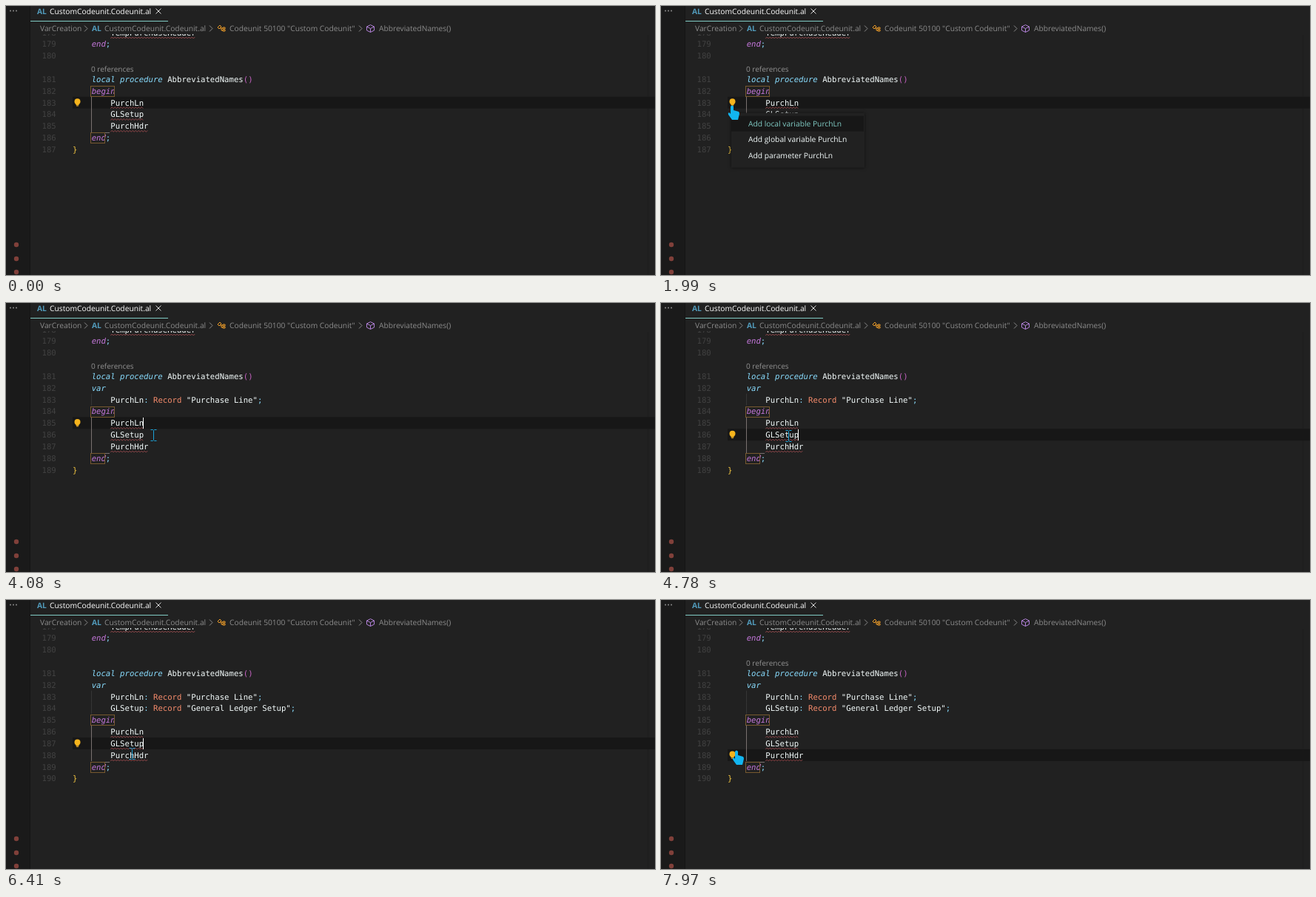
Write an HTML page with a canvas that moves like this. It is 877 by 364 pixels and loops after 8000 ms.

```html
<!DOCTYPE html>
<html lang="en">
<head>
<meta charset="utf-8">
<title>Code actions</title>
<style>
html, body { margin: 0; width: 100%; height: 100%; overflow: hidden; background: #212121; }
canvas { display: block; }
</style>
</head>
<body>
<canvas id="stage" width="877" height="364"></canvas>
<script>
const ctx = document.getElementById('stage').getContext('2d');
const LOOP = 8000, CHAR = 6.41, ROW = 15.85, TOP = 99;
const CODE = '10.65px "DejaVu Sans Mono", monospace';
const UI = '10.25px "Open Sans", "Noto Sans", sans-serif';
const WHITE = '#f4fcfc', CYAN = '#89ddff', PURPLE = '#c678dd', ORANGE = '#f78c6c', TEAL = '#80cbc4', GRAY = '#8c8c8c';

// Moments at which the editor changes
const ADD_LINE = 3000, FORMAT = 3800, ADD_SETUP = 6410;
const MENUS = [[1980, ADD_LINE, 'PurchLn', 183], [5640, ADD_SETUP, 'GLSetup', 186]];
// [start, line number]; 0 hides the bulb
const BULBS = [[0, 183], [ADD_LINE, 185], [4400, 0], [4480, 186], [ADD_SETUP, 187], [7430, 0], [7580, 188]];
// [on, off, line number, column]
const CARETS = [[600, 1670, 183, 11], [3000, 3530, 185, 11], [4060, 4400, 185, 11], [4400, 4930, 186, 11],
  [5460, 5640, 186, 11], [6410, 6960, 187, 11], [7430, 7960, 188, 12]];
// [time, x, y]
const POINTER = [[70, 638, 351], [200, 370, 225], [320, 235, 160], [450, 185, 138], [600, 185, 138],
  [760, 200, 128], [1140, 194, 132], [1300, 194, 132], [1680, 96, 131], [1830, 90, 134], [2140, 101, 134],
  [2520, 168, 174], [2840, 168, 174], [2920, 167, 163], [3150, 167, 163], [3310, 211, 173], [3790, 211, 173],
  [4080, 199, 179], [4640, 199, 179], [5180, 94, 181], [5490, 94, 181], [5600, 89, 181], [6030, 170, 208],
  [6410, 170, 208], [6790, 232, 203], [6960, 232, 203], [7110, 219, 208], [7430, 219, 208], [7970, 102, 203]];

const HAND = new Path2D('M-2 2Q0-1 2 2V7L9 9Q10 10 10 12L8 20H0L-5 13Q-6 11-4 10L-2 12Z');
const CUBE = new Path2D('M0-5L5-2.5V2.5L0 5L-5 2.5V-2.5ZM-5-2.5L0 0L5-2.5M0 0V5');
const CLASS = new Path2D('M-5-1L-2-4L0-2L-3 1ZM-2 0H2M0 0V3H2M2-1H5V1H2ZM2 2H5V4H2Z');

const lineY = n => TOP + (n - 181) * ROW;
const latest = (list, t) => list.filter(item => item[0] <= t).pop();

function text(str, x, y, color, font = UI) {
  ctx.font = font;
  ctx.fillStyle = color;
  ctx.fillText(str, x, y + 3.8);
}

function code(col, y, ...parts) {
  for (const [str, color, style = ''] of parts) {
    text(str, 90 + col * CHAR, y, color, style + CODE);
    col += str.length;
  }
}

function rect(x, y, w, h, color) {
  ctx.fillStyle = color;
  ctx.fillRect(x, y, w, h);
}

function path(shape, x, y, color, fill) {
  ctx.save();
  ctx.translate(x, y);
  ctx.fillStyle = ctx.strokeStyle = color;
  ctx.lineWidth = 1;
  fill ? ctx.fill(shape) : ctx.stroke(shape);
  ctx.restore();
}

function dot(x, y, r, color) {
  ctx.fillStyle = color;
  ctx.beginPath();
  ctx.arc(x, y, r, 0, 7);
  ctx.fill();
}

function squiggle(x, y, chars) {
  ctx.strokeStyle = '#93474a';
  ctx.lineWidth = 1;
  ctx.beginPath();
  for (let i = 0; i <= chars * CHAR; i += 2) ctx.lineTo(x + i, y + (i % 4 ? 6 : 8));
  ctx.stroke();
}

function statement(name, y) {
  code(8, y, [name, WHITE]);
  squiggle(90 + 8 * CHAR, y, name.length);
}

function block(keyword, y, end = '') {
  code(4, y, [keyword, PURPLE, 'italic '], [end, CYAN]);
  ctx.strokeStyle = '#77592f';
  ctx.lineWidth = 1;
  ctx.strokeRect(114.5, Math.round(y) - 6.5, Math.round(keyword.length * CHAR), 14);
}

function drawCode(t) {
  const stage = t < ADD_LINE ? 0 : t < ADD_SETUP ? 1 : 2;
  const last = 187 + (stage && stage + 1);
  const caret = CARETS.find(c => t >= c[0] && t < c[1]);
  const active = t < 3000 ? 183 : t < 4400 ? 185 : t < ADD_SETUP ? 186 : t < 7430 ? 187 : 188;

  rect(90, lineY(active) - 8, 787, 16, '#171717');
  const hidden = t > ADD_LINE && t < FORMAT || t > ADD_SETUP && t < 6750;
  if (!hidden) text('0 references', 115, 85.5, '#929292', UI.replace('10.25', '10'));

  for (let n = 179; n <= last; n++) {
    text(String(n), 48.5, n < 181 ? lineY(n) - ROW : lineY(n), '#424242', CODE);
  }
  ctx.save();
  ctx.beginPath();
  ctx.rect(33, 38, 844, 20);
  ctx.clip();
  text('178', 48.5, 36, '#424242', CODE);
  statement('TempPurchaseHeader', 36);
  ctx.restore();
  code(4, 51.5, ['end', PURPLE, 'italic '], [';', CYAN]);

  let n = 181;
  code(4, lineY(n++), ['local procedure ', CYAN, 'italic '], ['AbbreviatedNames', WHITE], ['()', '#c764c4']);
  if (stage) {
    code(4, lineY(n++), ['var', CYAN, 'italic ']);
    const declare = (name, table, col = 8) => {
      rect(115, lineY(n) - 8, 1, 16, '#353535');
      code(col, lineY(n++), [name, WHITE], [': ', CYAN], ['Record ', ORANGE], [`"${table}"`, WHITE], [';', CYAN]);
    };
    declare('PurchLn', 'Purchase Line', t < FORMAT ? 12 : 8);
    if (stage > 1) declare('GLSetup', 'General Ledger Setup');
  }
  const beginY = lineY(n++);
  for (const name of ['PurchLn', 'GLSetup', 'PurchHdr']) statement(name, lineY(n++));
  const endY = lineY(n);
  rect(115, Math.round(beginY) + 8, 1, Math.round(endY - beginY) - 15, '#78706f');
  rect(115, Math.round(endY) - 7, 25, 1, '#78706f');
  block('begin', beginY);
  block('end', endY, ';');
  code(0, lineY(last), ['}', '#f5c842']);

  if (caret) rect(Math.round(90 + (caret[3] + 4) * CHAR) - 1, Math.round(lineY(caret[2])) - 7, 1, 15, '#fff');
  const bulb = latest(BULBS, t)[1];
  if (bulb) drawBulb(96.5, lineY(bulb) - 1.5);
}

function drawBulb(x, y) {
  dot(x, y, 4, '#f5b41d');
  rect(x - 2, y + 2, 4, 3, '#f5b41d');
  rect(x - 1.5, y + 5, 3, 1.5, '#b98a28');
}

function drawMenu(name, line) {
  const y = lineY(line) + 14;
  ctx.save();
  ctx.shadowColor = '#0009';
  ctx.shadowBlur = 4;
  rect(95, y, 180, 74, '#212121');
  ctx.restore();
  rect(95, y + 4, 179, 21, '#171717');
  ['local variable', 'global variable', 'parameter'].forEach((kind, i) =>
    text(`Add ${kind} ${name}`, 118, y + 14.5 + i * 21.4, i ? WHITE : TEAL));
}

function drawFrame() {
  rect(0, 0, 877, 364, '#212121');
  rect(0, 0, 33, 364, '#1a1a1a');
  rect(32, 0, 1, 364, '#151515');
  rect(867, 39, 1, 325, '#1d1d1d');
  [6, 10, 14].forEach(x => dot(x, 6.5, 0.9, '#999'));
  [323, 342, 360].forEach(y => dot(14, y, 3.2, '#80403a'));

  text('AL', 42, 7, '#519aba', 'bold ' + UI);
  text('CustomCodeunit.Codeunit.al', 59, 7, '#fff');
  path(new Path2D('M-3.5-3.5L3.5 3.5M3.5-3.5L-3.5 3.5'), 206, 7, '#ddd');
  rect(33, 20, 186, 1, TEAL);

  text('VarCreation', 46, 30, GRAY);
  text('AL', 116, 30, '#519aba', 'bold ' + UI);
  text('CustomCodeunit.Codeunit.al', 133, 30, GRAY);
  text('Codeunit 50100 "Custom Codeunit"', 302, 30, GRAY);
  text('AbbreviatedNames()', 504, 30, GRAY);
  [108, 277, 479].forEach(x => path(new Path2D('M-2-4L2 0L-2 4'), x, 30.5, GRAY));
  path(CLASS, 291, 30, '#ee9d28');
  path(CUBE, 492.5, 30.5, '#b180d7');
}

function drawPointer(t) {
  const from = latest(POINTER, t);
  if (!from) return;
  const to = POINTER[POINTER.indexOf(from) + 1] || from;
  const k = to === from ? 0 : (t - from[0]) / (to[0] - from[0]);
  const [x, y] = [1, 2].map(i => Math.round(from[i] + (to[i] - from[i]) * k));
  if (x < 107) path(HAND, x, y, '#12b5f0', true);
  else path(new Path2D('M-4-7.5H-1L0-6.5L1-7.5H4M0-6.5V6.5M-4 7.5H-1L0 6.5L1 7.5H4'), x + 0.5, y, '#1ba1d6');
}

function draw(now) {
  const t = now % LOOP;
  ctx.textRendering = 'geometricPrecision';
  drawFrame();
  drawCode(t);
  for (const [open, close, name, line] of MENUS) if (t >= open && t < close) drawMenu(name, line);
  drawPointer(t);
}

const start = performance.now();
(function tick() {
  draw(performance.now() - start);
  requestAnimationFrame(tick);
})();
</script>
</body>
</html>
```
